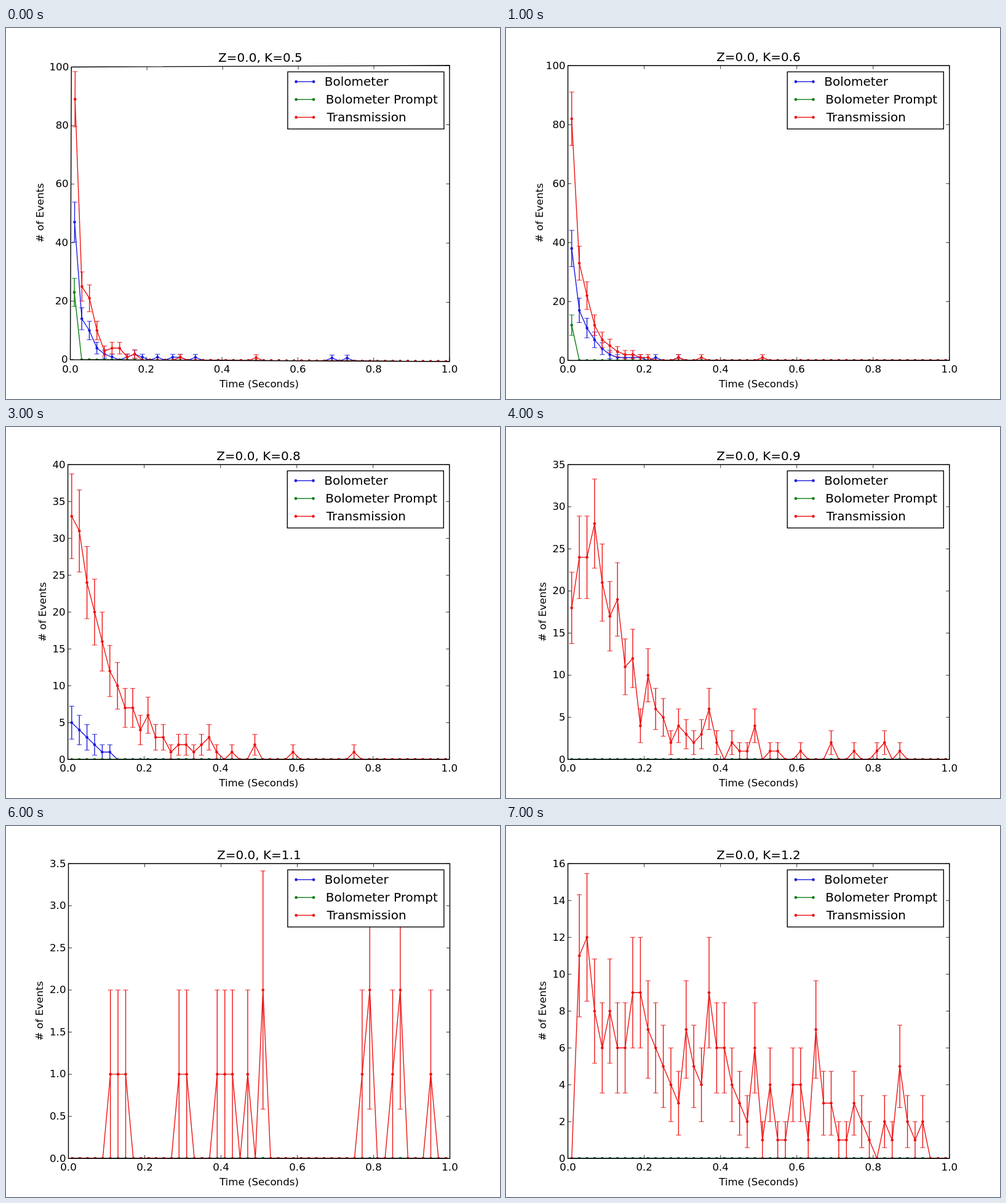
An HTML page for the animation above (8000 ms loop, 803 px wide and 604 px high).

```html
<!DOCTYPE html>
<html lang="en">
<head>
<meta charset="utf-8">
<title>Event histogram</title>
<style>
  html, body { margin: 0; width: 100%; height: 100%; overflow: hidden; background: #fff; }
  svg { display: block; font-family: "DejaVu Sans", sans-serif; font-size: 16.67px; }
  .big { font-size: 20px; }
</style>
</head>
<body>
<svg id="stage" width="803" height="604" viewBox="0 0 803 604"></svg>
<script>
const STEP = 1000, BINS = 50;
const BLUE = '#1c1ce0', GREEN = '#0d7d12', RED = '#ee1212';

// Axes corners: [left, top, right, bottom]
const BOX = [100.6, 61.3, 720.8, 541.3];
const SHIFTED = [101.5, 61.3, 721.5, 541.3];

// Counts per bin: a leading run, then single bins as {index: count}
const plots = [
  { k: 0.5, max: 100, tick: 20, labelX: 61, skew: true,
    blue: [[47, 14, 10, 4, 2, 1, 0, 1, 2, 1, 0, 1, 0, 1, 1, 0, 1], { 34: 1, 36: 1 }],
    green: [[23]],
    red: [[89, 25, 21, 10, 3, 4, 4, 1, 2], { 14: 1, 24: 1 }] },
  { k: 0.6, max: 100, tick: 20, labelX: 60,
    blue: [[38, 17, 11, 7, 4, 2, 1, 1, 1, 1], { 11: 1, 14: 1 }],
    green: [[12]],
    red: [[82, 33, 22, 12, 7, 5, 3, 2, 2, 1, 1], { 14: 1, 17: 1, 25: 1 }] },
  { k: 0.7, max: 70, tick: 10, box: SHIFTED,
    blue: [[23, 19, 11, 11, 5, 2, 1, 3, 0, 1, 0, 1]],
    green: [[4]],
    red: [[58, 39, 23, 13, 11, 7, 2, 4, 2, 3, 2, 1, 1, 0, 1, 0, 0, 2], { 26: 1, 29: 1, 49: 1 }] },
  { k: 0.8, max: 40, tick: 5,
    blue: [[5, 4, 3, 2, 1, 1]],
    green: [[]],
    red: [[33, 31, 24, 20, 16, 12, 10, 7, 7, 4, 6, 3, 3, 1, 2, 2, 1, 2, 3, 1], { 21: 1, 24: 2, 29: 1, 37: 1 }] },
  { k: 0.9, max: 35, tick: 5,
    blue: [[]], green: [[]],
    red: [[18, 24, 24, 28, 21, 17, 19, 11, 12, 4, 10, 6, 5, 2, 4, 3, 2, 3, 6, 2, 0, 2, 1, 1, 4, 0, 1, 1],
      { 30: 1, 34: 2, 37: 1, 40: 1, 41: 2, 43: 1 }] },
  { k: 1.0, max: 30, tick: 5,
    blue: [[]], green: [[]],
    red: [[0, 24, 14, 11, 13, 15, 12, 11, 11, 12, 8, 8, 2, 9, 4, 9, 6, 10, 4, 2, 4, 4, 3, 1, 3, 3, 1, 1, 0,
      6, 3, 2, 0, 2, 2, 1, 2, 3], { 40: 2, 43: 3, 45: 1, 46: 1, 47: 1, 48: 1 }] },
  { k: 1.1, max: 3.5, tick: 0.5, labelX: 60, box: SHIFTED,
    blue: [[]], green: [[]],
    red: [[], { 5: 1, 6: 1, 7: 1, 14: 1, 15: 1, 19: 1, 20: 1, 21: 1, 23: 1, 25: 2, 38: 1, 39: 2, 42: 1, 43: 2, 47: 1 }] },
  { k: 1.2, max: 16, tick: 2,
    blue: [[]], green: [[]],
    red: [[0, 11, 12, 8, 6, 8, 6, 6, 9, 9, 7, 6, 5, 4, 3, 7, 5, 4, 9, 6, 6, 4, 3, 2, 6, 1, 4, 1, 1, 4, 4, 1,
      7, 3, 3, 1, 1, 3, 2, 1, 0, 2, 1, 5, 2, 1, 2]] }
];

const stage = document.getElementById('stage');

function add(parent, tag, attrs, text) {
  const el = document.createElementNS('http://www.w3.org/2000/svg', tag);
  for (const name in attrs) el.setAttribute(name, attrs[name]);
  if (text !== undefined) el.textContent = text;
  parent.appendChild(el);
  return el;
}

const stroke = (g, d, color, width) =>
  add(g, 'path', { d, fill: 'none', stroke: color, 'stroke-width': width });

const label = (g, x, y, text, anchor = 'middle', extra = {}) =>
  add(g, 'text', { x, y, 'text-anchor': anchor, ...extra }, text);

const dots = (g, points, color) =>
  points.forEach(([cx, cy]) => add(g, 'circle', { cx, cy, r: 2.3, fill: color }));

// Maps axes fractions (u right, v up) to the stage
function mapper({ box = BOX, skew }) {
  const [l, t, r, b] = box;
  if (!skew) return (u, v) => [l + (r - l) * u, b + (t - b) * v];
  const mix = (p, q, f) => p + (q - p) * f;
  return (u, v) => [
    mix(mix(104.5, 106.3, v), 721, u),
    mix(mix(540, 543, u), mix(63.5, 61, u), v)
  ];
}

function drawSeries(g, at, max, [run, singles = {}], color) {
  const counts = Array.from({ length: BINS }, (_, i) => run[i] || singles[i] || 0);
  const points = counts.map((n, i) => at((i + 0.5) / BINS, n / max));
  stroke(g, 'M' + points.join('L'), color, 1.39);
  let bars = '', caps = '';
  counts.forEach((n, i) => {
    if (!n) return;
    const ends = [-1, 1].map(s => at((i + 0.5) / BINS, (n + s * Math.sqrt(n)) / max));
    bars += 'M' + ends.join('L');
    for (const [x, y] of ends) caps += `M${x - 4.1},${y}h8.2`;
  });
  stroke(g, bars, color, 1.39);
  stroke(g, caps, color, 0.9);
  dots(g, points, color);
}

function drawAxes(g, at, plot) {
  let ticks = '';
  for (let i = 0; i <= 5; i++) {
    const low = at(i / 5, 0), high = at(i / 5, 1);
    ticks += `M${low}v-5.6M${high}v5.6`;
    label(g, low[0], 561, (i / 5).toFixed(1));
  }
  const rows = Math.round(plot.max / plot.tick);
  for (let i = 0; i <= rows; i++) {
    const left = at(0, i / rows), right = at(1, i / rows);
    ticks += `M${left}h5.6M${right}h-5.6`;
    label(g, left[0] - 4, left[1] + 5.2, (i * plot.tick).toFixed(plot.tick < 1 ? 1 : 0), 'end');
  }
  stroke(g, ticks, '#000', 0.8);
  stroke(g, `M${at(0, 0)}L${at(1, 0)}L${at(1, 1)}L${at(0, 1)}Z`, '#000', 1.39);
}

function drawLegend(g, dx) {
  add(g, 'rect', { x: 457.3 + dx, y: 71.4, width: 254, height: 93, fill: '#fff', stroke: '#000', 'stroke-width': 1.39 });
  const rows = [['Bolometer', BLUE, 517.2], ['Bolometer Prompt', GREEN, 519.2], ['Transmission', RED, 520.8]];
  rows.forEach(([name, color, x], i) => {
    const y = 87.4 + 29 * i;
    stroke(g, `M${471 + dx},${y}h28.5`, color, 1.39);
    dots(g, [[471 + dx, y], [499.5 + dx, y]], color);
    label(g, x + dx, y + 6.6, name, 'start', { class: 'big' });
  });
}

function drawPlot(plot, i) {
  const g = add(stage, 'g', { visibility: 'hidden' });
  const at = mapper(plot);
  const clip = add(g, 'clipPath', { id: 'axes' + i });
  add(clip, 'polygon', { points: [at(0, 0), at(1, 0), at(1, 1), at(0, 1)].join(' ') });
  const data = add(g, 'g', { 'clip-path': `url(#axes${i})` });
  drawSeries(data, at, plot.max, plot.blue, BLUE);
  drawSeries(data, at, plot.max, plot.green, GREEN);
  drawSeries(data, at, plot.max, plot.red, RED);
  drawAxes(g, at, plot);

  const dx = plot.box || plot.skew ? 0.6 : 0;
  const mid = at(0.5, 1)[0];
  label(g, mid - 0.2, plot.skew ? 54.8 : 54, `Z=0.0, K=${plot.k.toFixed(1)}`, 'middle', { class: 'big' });
  label(g, 410.8 + dx, 585, 'Time (Seconds)');
  label(g, 0, 0, '# of Events', 'middle', { transform: `translate(${plot.labelX || 65} 301) rotate(-90)` });
  drawLegend(g, dx);
  return g;
}

const scenes = plots.map(drawPlot);
const start = performance.now();
let shown = -1;

function tick() {
  const now = Math.floor((performance.now() - start) / STEP) % scenes.length;
  if (now !== shown) {
    scenes.forEach((g, i) => g.setAttribute('visibility', i === now ? 'visible' : 'hidden'));
    shown = now;
  }
  requestAnimationFrame(tick);
}
tick();
</script>
</body>
</html>
```
